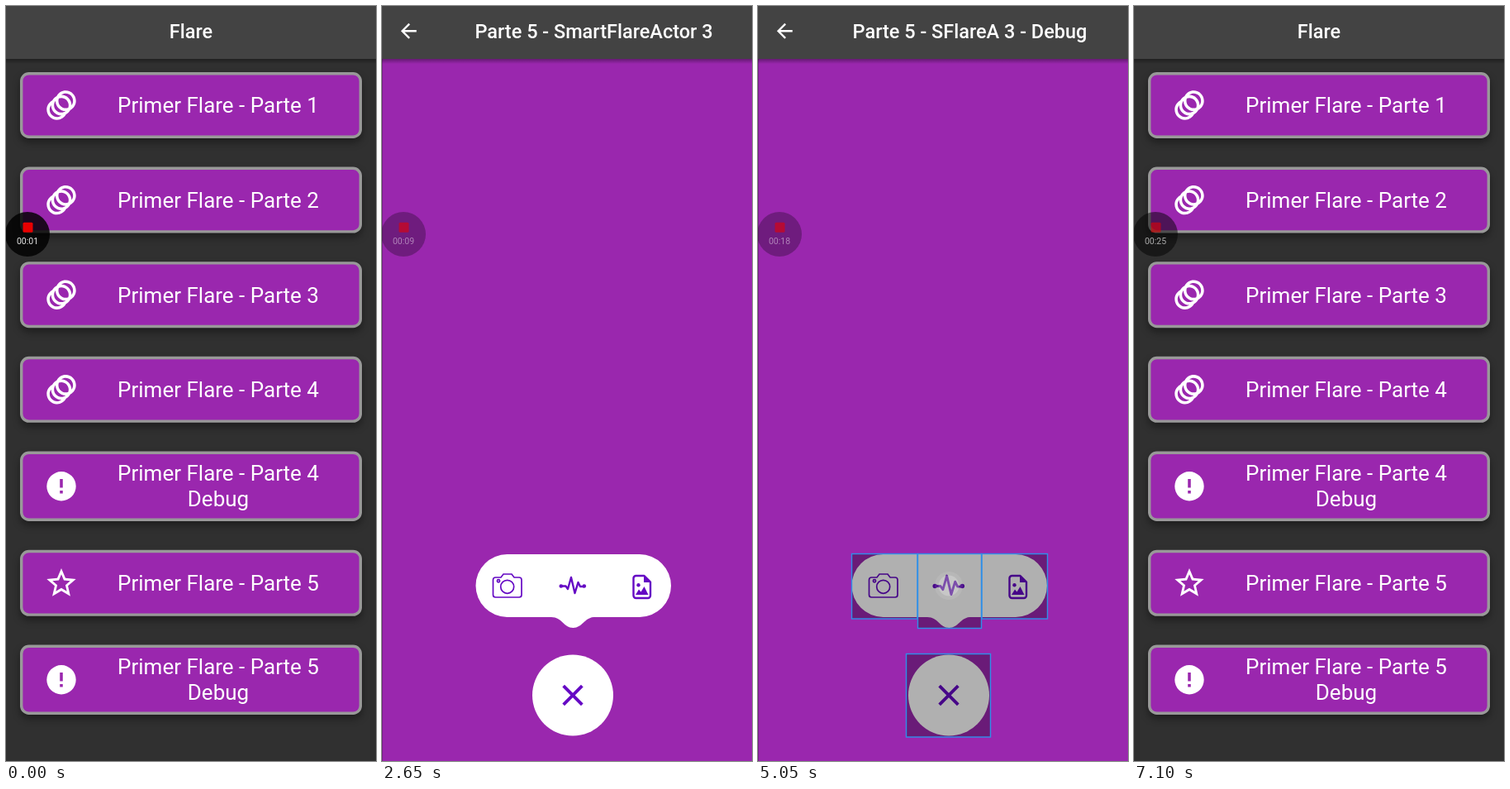
An HTML page for the animation above (7.15 s loop, 448 px wide and 913 px high).

```html
<!DOCTYPE html>
<html lang="es">
<head>
<meta charset="utf-8">
<title>Flare</title>
<style>
html, body { margin: 0; width: 100%; height: 100%; overflow: hidden; background: #303030; }
svg { display: block; font-family: Roboto, sans-serif; }
text { text-anchor: middle; fill: #fff; }
.title { font-size: 23.5px; font-weight: 500; }
.label { font-size: 26px; }
.card rect { fill: #9a27ae; stroke: #999; stroke-width: 3.4; filter: drop-shadow(0 5px 5px rgba(0,0,0,.38)); }
.line { fill: none; stroke: #6509c4; }
.solid { fill: #6509c4; }
.area { fill: #000; fill-opacity: .31; stroke: none; }
.edge { fill: none; stroke: #2f8fe8; stroke-width: 1.4; }
</style>
</head>
<body>
<svg id="stage" width="448" height="913" viewBox="0 0 448 913"></svg>
<script>
const LOOP = 7150;
const stage = document.getElementById('stage');

const ICONS = {
  rings: 'M15 2c-2.71 0-5.05 1.54-6.22 3.78-1.28.67-2.34 1.72-3 3C3.54 9.95 2 12.29 2 15c0 3.87 3.13 7 7 7 2.71 0 5.05-1.54 6.22-3.78 1.28-.67 2.34-1.72 3-3C20.46 14.05 22 11.71 22 9c0-3.87-3.13-7-7-7zM9 20c-2.76 0-5-2.24-5-5 0-1.12.37-2.16 1-3 0 3.87 3.13 7 7 7-.84.63-1.88 1-3 1zm3-3c-2.76 0-5-2.24-5-5 0-1.12.37-2.16 1-3 0 3.86 3.13 6.99 7 7-.84.63-1.88 1-3 1zm4.7-3.3c-.53.19-1.1.3-1.7.3-2.76 0-5-2.24-5-5 0-.6.11-1.17.3-1.7.53-.19 1.1-.3 1.7-.3 2.76 0 5 2.24 5 5 0 .6-.11 1.17-.3 1.7zM19 12c0-3.86-3.13-6.99-7-7 .84-.63 1.87-1 3-1 2.76 0 5 2.24 5 5 0 1.12-.37 2.16-1 3z',
  alert: 'M12 2a10 10 0 1 0 0 20a10 10 0 1 0 0-20zm1 15h-2v-2h2v2zm0-4h-2V7h2v6z',
  star: 'M22 9.24l-7.19-.62L12 2 9.19 8.63 2 9.24l5.46 4.73L5.82 21 12 17.27 18.18 21l-1.63-7.03L22 9.24zM12 15.4l-3.76 2.27 1-4.28-3.32-2.88 4.38-.38L12 6.1l1.71 4.04 4.38.38-3.32 2.88 1 4.28L12 15.4z',
  back: 'M20 11H7.83l5.59-5.59L12 4l-8 8 8 8 1.41-1.41L7.83 13H20v-2z'
};

const icon = (name, x, y, scale) =>
  `<path d="${ICONS[name]}" fill="#fff" fill-rule="evenodd" transform="translate(${x} ${y}) scale(${scale}) translate(-12 -12)"/>`;

const appBar = (title, x) => `
  <rect y="63" width="448" height="7" fill="url(#shade)"/>
  <rect width="448" height="64" fill="#434343"/>
  <text class="title" x="${x}" y="39">${title}</text>`;

function card(y, height, name, part, debug) {
  const mid = y + height / 2;
  const label = (text, baseline) => `<text class="label" x="257" y="${baseline}">${text}</text>`;
  const title = 'Primer Flare - Parte ' + part;
  return `<g class="card">
    <rect x="18.7" y="${y + 1.7}" width="410.6" height="${height - 3.4}" rx="9"/>
    ${icon(name, 67, mid, 1.77)}
    ${debug ? label(title, mid - 6.5) + label('Debug', mid + 24) : label(title, mid + 9.3)}
  </g>`;
}

const AREAS = [[113.5, 662.5, 79.5, 78.5], [193.5, 662.5, 77, 90], [271, 662.5, 79.5, 78.5], [179.5, 783.5, 102, 100.5]];
const rects = cls => AREAS.map(([x, y, w, h]) =>
  `<rect class="${cls}" x="${x}" y="${y}" width="${w}" height="${h}"/>`).join('');

const page = (id, title, debug) => `<g id="${id}">
  <rect width="448" height="913" fill="#9a27ae"/>
  <rect y="64" width="1" height="849" fill="#000" opacity=".25"/>
  ${appBar(title, 256.5)}
  ${icon('back', 32.3, 30.3, 1.18)}
  <g class="menu">
    <path fill="#fff" d="M151.5 663H312a38 38 0 0 1 0 76H258C245 739 243 752 231.5 752S218 739 205 739H151.5a38 38 0 0 1 0-76z"/>
    <g class="camera line" stroke-width="1.7">
      <path d="M137.5 691H144L147 687H157L160 691H166a3 3 0 0 1 3 3V712a3 3 0 0 1-3 3H137.500a3 3 0 0 1-3-3V694a3 3 0 0 1 3-3z"/>
      <circle cx="151.700" cy="702.300" r="8"/><circle cx="141" cy="695.300" r="1.600"/>
    </g>
    <g class="pulse">
      <path class="line" stroke-width="2.4" stroke-linejoin="round" d="M217 701.500H222.500L225 705L229 691L233.500 710L237.500 697L240 702H245"/>
      <circle class="solid" cx="216.800" cy="701.500" r="2.300"/><circle class="solid" cx="244.800" cy="701.500" r="2.300"/>
    </g>
    <g class="image">
      <path class="line" stroke-width="2.4" stroke-linejoin="round" d="M307.500 689H317.500L325 696.500V713a3 3 0 0 1-3 3H307.500a3 3 0 0 1-3-3V692a3 3 0 0 1 3-3z"/>
      <path class="solid" d="M317 689V697H325zM307 712L311 705.500L313.500 708.500L317.500 702L322.500 712z"/>
      <circle class="solid" cx="310.500" cy="700.300" r="2.200"/>
    </g>
  </g>
  <circle cx="231" cy="833.500" r="49" fill="#fff"/>
  <path class="cross line" stroke="#6a14b8" stroke-width="3.800" d="M215 833.500H247M231 817.500V849.500"/>
  ${debug ? rects('area') + rects('edge') : ''}
</g>`;

stage.innerHTML = `
  <defs><linearGradient id="shade" x2="0" y2="1">
    <stop stop-opacity=".4"/><stop offset="1" stop-opacity="0"/>
  </linearGradient></defs>
  <rect width="448" height="913" fill="#303030"/>
  ${appBar('Flare', 224)}
  ${[1, 2, 3, 4].map(n => card(80 + (n - 1) * 114.6, 80, 'rings', n)).join('')}
  ${card(538.5, 84.5, 'alert', 4, true)}
  ${card(657.8, 80, 'star', 5)}
  ${card(772.5, 84.5, 'alert', 5, true)}
  ${page('smart', 'Parte 5 - SmartFlareActor 3', false)}
  ${page('debug', 'Parte 5 - SFlareA 3 - Debug', true)}
  <g id="recorder">
    <circle cx="26" cy="276" r="27"/>
    <rect x="20.500" y="261.700" width="12" height="12" rx="1.500" fill="#e80000"/>
    <text x="26" y="287.700" font-size="10.500"></text>
  </g>
  <g id="touch" fill="#fff">
    <circle r="17" opacity=".18"/><circle r="12.500" opacity=".5"/>
  </g>`;

const PAGES = [
  { id: 'smart', enter: 200, leave: 3600, open: 530, close: 2900 },
  { id: 'debug', enter: 3985, leave: 7000, open: 4350, close: 6450 }
];

// Each touch: start time, x, y, icon it plays
const TOUCHES = [
  [60, 250, 697], [480, 231, 833], [1050, 152, 701, 'camera'], [1230, 231, 701, 'pulse'],
  [1410, 314, 701, 'image'], [1600, 378, 697], [2000, 152, 833], [2850, 231, 833],
  [3470, 41, 21], [3840, 250, 815],
  [4300, 231, 833], [4650, 152, 701, 'camera'], [4900, 231, 701, 'pulse'],
  [5150, 314, 701, 'image'], [5550, 378, 701], [5970, 152, 833], [6400, 231, 833], [6880, 33, 40]
];
const CENTERS = { camera: 151.7, pulse: 231, image: 314.5 };
const CLOCK = [[0, 1], [3550, 12.9], [4150, 15.05], [LOOP, 25.2]];

const clamp = v => Math.max(0, Math.min(1, v));
const ramp = (t, start, length) => clamp((t - start) / length);
const ease = p => 1 - (1 - p) ** 3;
const set = (el, attrs) => { for (const key in attrs) el.setAttribute(key, attrs[key]); };
const zoom = (x, y, s) => `translate(${x} ${y}) scale(${s}) translate(${-x} ${-y})`;

function seconds(t) {
  const i = CLOCK.findIndex(([end]) => t < end);
  const [t0, s0] = CLOCK[i - 1], [t1, s1] = CLOCK[i];
  return Math.floor(s0 + (s1 - s0) * (t - t0) / (t1 - t0));
}

function drawPage(t, { id, enter, leave, open, close }) {
  const el = document.getElementById(id);
  const shown = ease(ramp(t, enter, 90)) * (1 - ramp(t, leave, 90) ** 2);
  set(el, { opacity: shown, transform: `translate(0 ${228 * (1 - shown)})`, display: shown ? 'inline' : 'none' });

  const opened = ease(ramp(t, open, 230)) * (1 - ease(ramp(t, close, 230)));
  set(el.querySelector('.menu'), { transform: zoom(231.5, 790, opened), opacity: clamp(opened * 2) });
  set(el.querySelector('.cross'), { transform: `rotate(${45 * opened} 231 833.5)` });

  for (const name in CENTERS) {
    const hit = TOUCHES.find(([start, , , target]) => target === name && t >= start && t < start + 220);
    const size = hit ? 1 + .22 * Math.sin(Math.PI * (t - hit[0]) / 220) : 1;
    set(el.querySelector('.' + name), { transform: zoom(CENTERS[name], 701.5, size) });
  }
}

function drawRecorder(t) {
  const [disc, stop, label] = document.getElementById('recorder').children;
  const dim = ramp(t, 100, 200) * (1 - .4 * ramp(t, 7000, 90));
  set(disc, { opacity: .82 - .54 * dim });
  set(stop, { opacity: 1 - .42 * ramp(t, 100, 200) });
  set(label, { opacity: .9 - .45 * dim });
  label.textContent = '00:' + String(seconds(t)).padStart(2, '0');
}

function drawTouch(t) {
  const hit = TOUCHES.find(([start]) => t >= start && t < start + 200);
  const el = document.getElementById('touch');
  if (!hit) return set(el, { opacity: 0 });
  const [start, x, y] = hit;
  set(el, { transform: `translate(${x} ${y})`, opacity: ramp(t, start, 40) * (1 - ramp(t, start + 100, 100)) });
}

function frame() {
  const t = performance.now() % LOOP;
  PAGES.forEach(p => drawPage(t, p));
  drawRecorder(t);
  drawTouch(t);
  requestAnimationFrame(frame);
}
frame();
</script>
</body>
</html>
```
